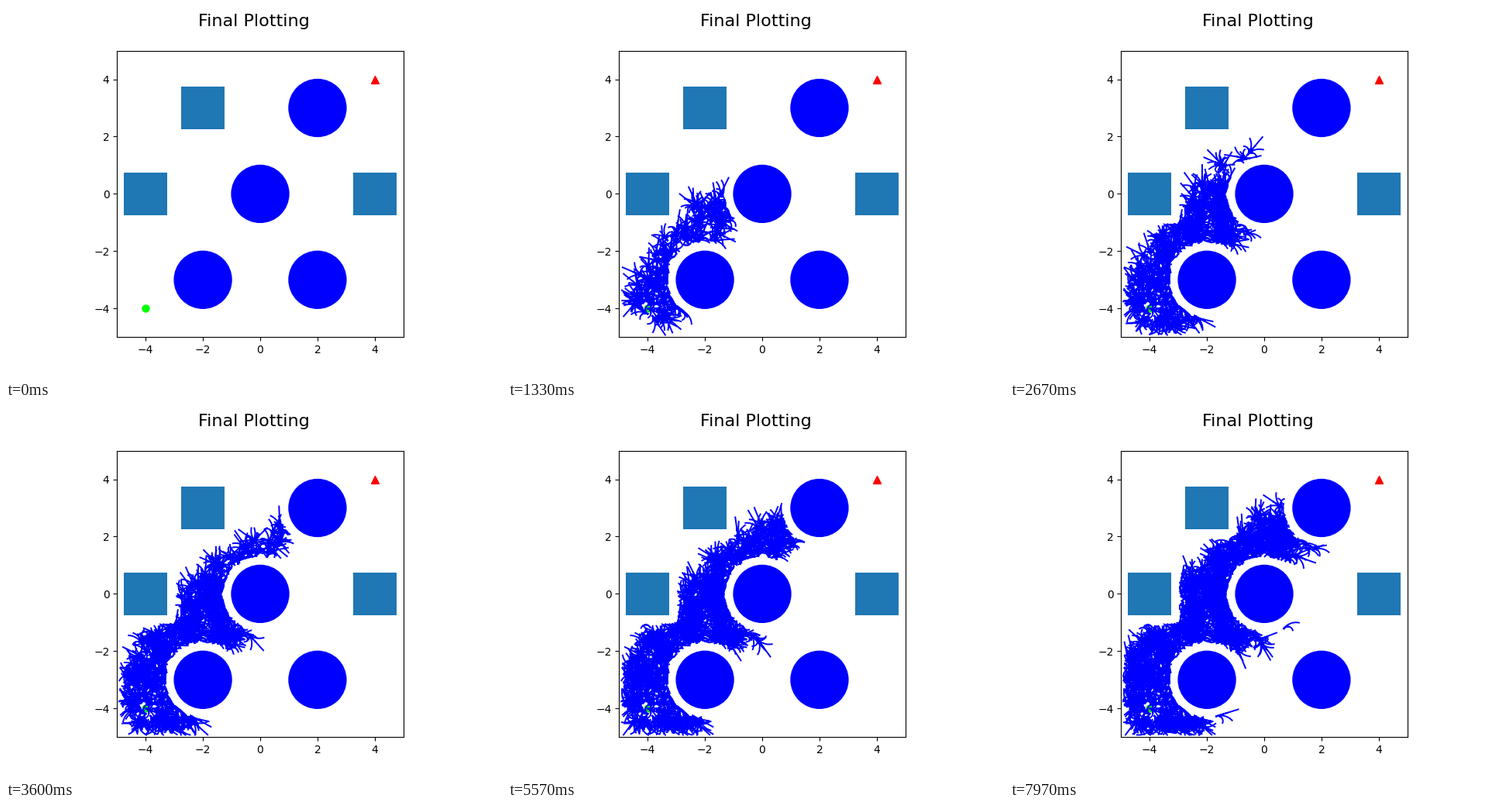
Write a matplotlib script that moves like this. It is 640x480 px and loops after 8 s.

```python
import numpy as np
import matplotlib.pyplot as plt
from matplotlib.animation import FuncAnimation
from matplotlib.patches import Circle, Rectangle

FRAMES, INTERVAL = 200, 40
START, GOAL = np.array([-4.0, -4.0]), np.array([4.0, 4.0])
DISCS = [(0, 0), (-2, -3), (2, -3), (2, 3)]
BOXES = [(-4, 0), (-2, 3), (4, 0)]
RADIUS, HALF = 1.0, 0.75
CLEARANCE, WALL = 0.3, 4.93
WHEELBASE = 0.354
SLOW, FAST = 0.4, 0.8
BLUE = "blue"

# Cost limit reached by the search at given seconds
TIMES = [0, 0.6, 1.33, 2.67, 3.6, 5.57, 6.87, 8.0]
LIMITS = [11.31, 11.74, 12.0, 12.3, 12.42, 12.56, 12.71, 12.79]


def is_free(x, y):
    ok = (np.abs(x) < WALL) & (np.abs(y) < WALL)
    for cx, cy in DISCS:
        ok &= np.hypot(x - cx, y - cy) > RADIUS + CLEARANCE
    for cx, cy in BOXES:
        dx = np.maximum(np.abs(x - cx) - HALF, 0)
        dy = np.maximum(np.abs(y - cy) - HALF, 0)
        ok &= np.hypot(dx, dy) > CLEARANCE
    return ok


def travel_costs(step=0.1, pad=2):
    """Shortest way from the start to each grid cell, around the obstacles."""
    axis = np.linspace(-5, 5, int(round(10 / step)) + 1)
    n = len(axis)
    free = is_free(*np.meshgrid(axis, axis, indexing="ij"))
    cost = np.full((n + 2 * pad, n + 2 * pad), np.inf)
    i, j = np.rint((START + 5) / step).astype(int) + pad
    cost[i, j] = 0
    inner = cost[pad:-pad, pad:-pad]
    moves = [(a, b) for a in range(-2, 3) for b in range(-2, 3)
             if np.gcd(a, b) == 1]
    for _ in range(120):
        for a, b in moves:
            near = cost[pad + a:pad + a + n, pad + b:pad + b + n]
            better = np.minimum(inner, near + step * np.hypot(a, b))
            inner[free] = better[free]
    return inner


def nearest_cost(pts, costs, step=0.1):
    """Cost at the best cell around each point, so edges are not lost."""
    low = np.floor((pts + 5) / step).astype(int)
    best = np.full(len(pts), np.inf)
    for a in (0, 1):
        for b in (0, 1):
            i, j = np.minimum(low + (a, b), len(costs) - 1).T
            off = np.hypot(pts[:, 0] + 5 - i * step, pts[:, 1] + 5 - j * step)
            best = np.minimum(best, costs[i, j] + off)
    return best


def sample_nodes(rng, count=3900):
    """Tree nodes with the second at which each one is expanded."""
    pts = rng.uniform(-4.9, 4.9, (count, 2))
    pts[0] = START
    pts = pts[is_free(pts[:, 0], pts[:, 1])]
    so_far = nearest_cost(pts, travel_costs())
    to_go = np.hypot(*(GOAL - pts).T)
    # Some nodes are expanded at once, others fill the gaps later
    delay = 0.5 * rng.random(len(pts)) ** 2
    total = 1.08 * so_far + to_go + delay
    total[0] = LIMITS[0] + 0.01
    rel = pts - START
    heading = np.arctan2(rel[:, 1], rel[:, 0]) + rng.normal(0, 0.9, len(pts))
    keep = total <= LIMITS[-1]
    return pts[keep], heading[keep], np.interp(total[keep], LIMITS, TIMES)


def wheel_arcs(pos, heading):
    """Collision-free arcs of a two-wheeled robot for all wheel speeds."""
    speeds = (0, SLOW, FAST)
    s = np.linspace(0, 1, 9)
    arcs = []
    for left in speeds:
        for right in speeds:
            if left == right == 0:
                continue
            bend = (right - left) / WHEELBASE * s / 2
            chord = (left + right) / 2 * s * np.sinc(bend / np.pi)
            x = pos[0] + chord * np.cos(heading + bend)
            y = pos[1] + chord * np.sin(heading + bend)
            if is_free(x, y).all():
                arcs.append(np.column_stack([x, y]))
    return arcs


fig, ax = plt.subplots(figsize=(6.4, 4.8), dpi=100)
fig.suptitle("Final Plotting", fontsize=16)
ax.set_aspect("equal")
ax.set_xlim(-5, 5)
ax.set_ylim(-5, 5)
for center in DISCS:
    ax.add_patch(Circle(center, RADIUS, color=BLUE))
for cx, cy in BOXES:
    ax.add_patch(Rectangle((cx - HALF, cy - HALF), 2 * HALF, 2 * HALF))
ax.plot(*START, "o", color="lime", ms=6.5)
ax.plot(*GOAL, "^", color="red", ms=7.5)

batches = [[] for _ in range(FRAMES)]
gap = np.full((1, 2), np.nan)
for pos, heading, second in zip(*sample_nodes(np.random.default_rng(7))):
    index = int(np.ceil(second * 1000 / INTERVAL))
    if index < FRAMES:
        for arc in wheel_arcs(pos, heading):
            batches[index] += [arc, gap]

branches = []
for index, parts in enumerate(batches):
    if parts:
        xy = np.concatenate(parts)
        line, = ax.plot(xy[:, 0], xy[:, 1], color=BLUE, lw=1.4, visible=False)
        branches.append((index, line))


def update(frame):
    for index, line in branches:
        line.set_visible(index <= frame)
    return [line for _, line in branches]


anim = FuncAnimation(fig, update, frames=FRAMES, interval=INTERVAL,
                     init_func=lambda: update(0), repeat=True)
plt.show()
```
